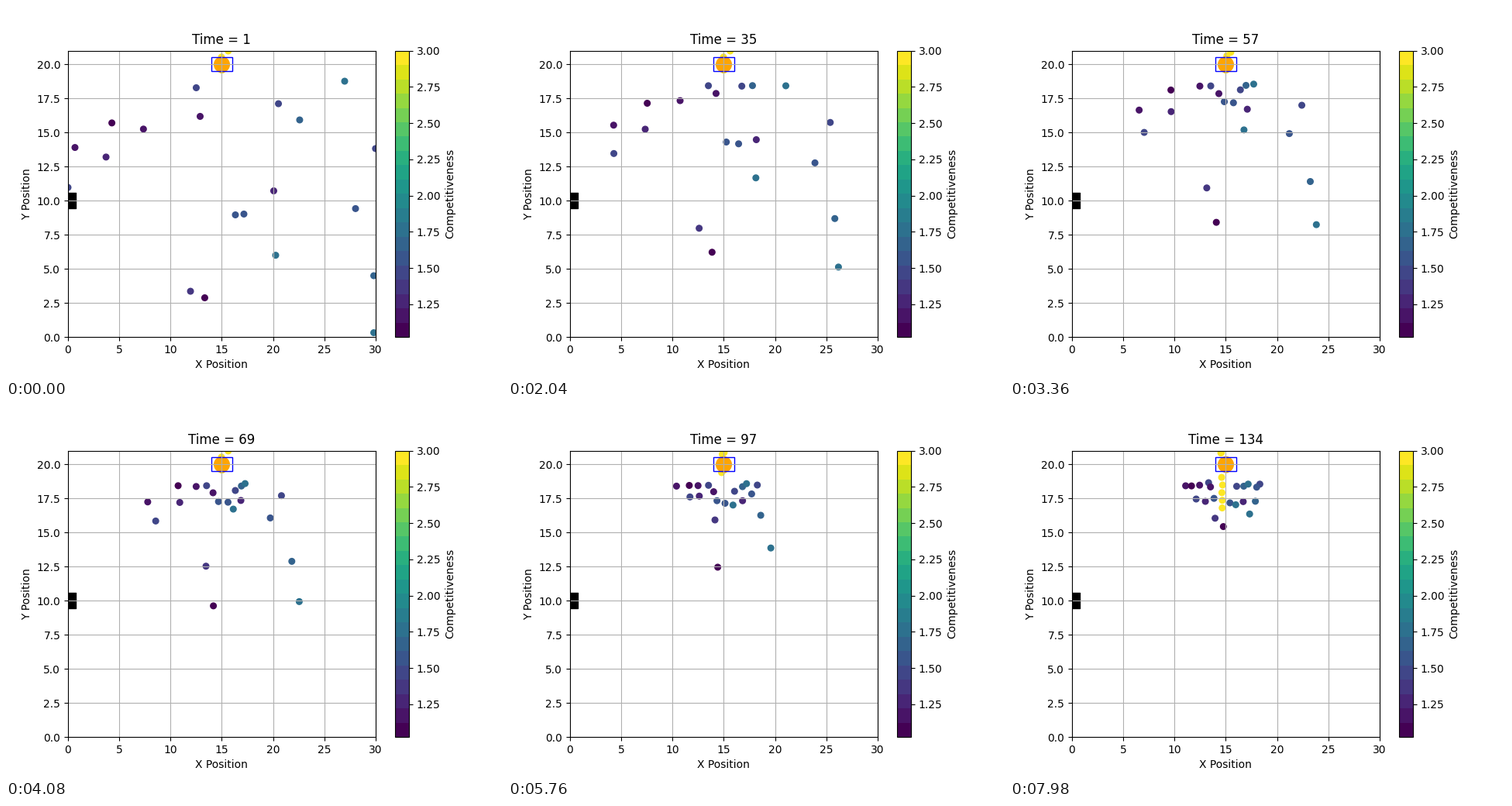
Recreate the animation shown at these times as a matplotlib script. Size 640x480 px, loop 8000 ms.

```python
import numpy as np
import matplotlib.pyplot as plt
from matplotlib.animation import FuncAnimation
from matplotlib.patches import Rectangle

FRAMES = 134
LOOP_MS = 8000
STAGE = np.array([15, 20])
EXIT = (0, 10)
FRONT = 18.3        # nobody in the crowd stays above this line
LEAVERS = 6

# start x, start y, competitiveness
CROWD = np.array([
    (0.68, 13.9, 1.16), (4.28, 15.7, 1.03), (7.36, 15.25, 1.16),
    (3.71, 13.2, 1.24), (0, 10.97, 1.48), (12.51, 18.28, 1.45),
    (12.89, 16.18, 1.16), (20.53, 17.11, 1.45), (22.6, 15.92, 1.68),
    (26.99, 18.76, 1.78), (30, 13.82, 1.47), (28.05, 9.42, 1.57),
    (29.83, 4.5, 1.7), (17.16, 9.02, 1.56), (16.33, 8.96, 1.58),
    (20.07, 10.72, 1.24), (20.26, 6.0, 1.8), (29.83, 0.32, 1.78),
    (11.95, 3.36, 1.34), (13.34, 2.88, 1.03),
])
START, LEVEL = CROWD[:, :2], CROWD[:, 2]
SPEED = 0.1 * LEVEL


def leaving(k):
    """People who drop out below the stage one after another."""
    n = np.arange(LEAVERS)
    fall = 0.07 * np.clip(k - 93 - 8 * n, 0, None)
    x = 15 - np.minimum(fall, 0.35) + 0.1 * np.sin(3 * n)
    return np.column_stack([x, 19.6 - fall])


def lingering(k):
    """Two people swaying behind the stage, later moving to its left."""
    shift = np.clip((k - 82) / 30, 0, 1)
    center = np.array([15.3 - 0.75 * shift, 20.75 + 0.1 * shift])
    reach = (0.27 + 0.13 * np.cos(2 * np.pi * k / 17)) * (1 - 0.9 * shift)
    sway = reach * np.array([np.cos(0.6), np.sin(0.6)])
    return np.array([center - sway, center + sway])


def walk_crowd():
    """Head for the stage, keep apart, and queue in order of arrival."""
    arrival = np.linalg.norm(STAGE - START, axis=1) / SPEED
    hold = 2.1 + 0.12 * arrival.argsort().argsort()
    pos = START.copy()
    track = [pos]
    for k in range(1, FRAMES):
        to_stage = STAGE - pos
        dist = np.linalg.norm(to_stage, axis=1)
        step = np.clip(dist - hold, 0, SPEED)
        others = np.vstack([pos, leaving(k)])
        gap = pos[:, None] - others[None]
        d = np.linalg.norm(gap, axis=2)
        push = 0.07 * np.exp(-d / 0.8) / np.maximum(d, 0.1)
        pos = pos + to_stage * (step / dist)[:, None]
        pos += (gap * push[:, :, None]).sum(axis=1)
        pos[:, 1] -= 0.25 * np.clip(pos[:, 1] - FRONT, 0, None)
        track.append(pos)
    return track


TRACK = walk_crowd()


def positions(k):
    return np.vstack([TRACK[k], lingering(k), leaving(k)])


fig, ax = plt.subplots(figsize=(6.4, 4.8), dpi=100)
levels = np.append(LEVEL, [3.0] * (2 + LEAVERS))
people = ax.scatter(*positions(0).T, s=30, c=levels, vmin=1.024, vmax=3.0,
                    cmap=plt.get_cmap("viridis", 20))
ax.scatter(*STAGE, s=200, color="orange")
ax.scatter(*EXIT, s=200, color="black", marker="s")
ax.add_patch(Rectangle((14, 19.5), 2, 1, fill=False, edgecolor="blue"))
fig.colorbar(people, ax=ax, label="Competitiveness")
ax.set(xlim=(0, 30), ylim=(0, 21), xlabel="X Position", ylabel="Y Position")
ax.grid(True)
title = ax.set_title("Time = 1")


def update(k):
    people.set_offsets(positions(k))
    title.set_text(f"Time = {k + 1}")
    return people, title


anim = FuncAnimation(fig, update, frames=FRAMES, interval=LOOP_MS / FRAMES,
                     repeat=True, repeat_delay=0)
plt.show()
```
